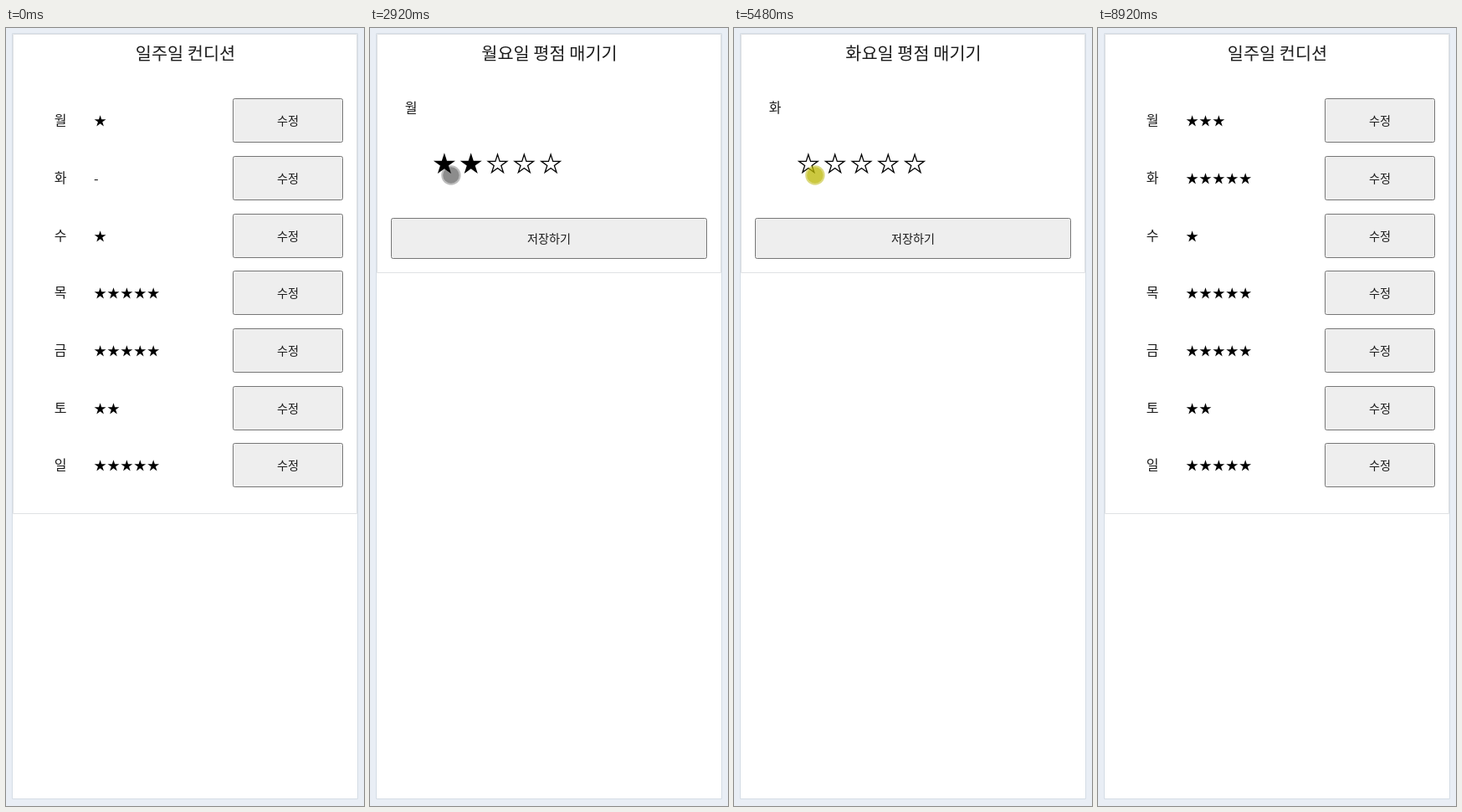
An HTML page with a canvas that plays this animation: 428 px wide and 930 px high, repeating every 9.08 s.

```html
<!DOCTYPE html>
<html lang="ko">
<head>
<meta charset="utf-8">
<style>
  html, body { margin: 0; width: 100%; height: 100%; overflow: hidden; background: #e9eef5; }
  canvas { display: block; }
</style>
</head>
<body>
<canvas id="stage" width="428" height="930"></canvas>
<script>
const g = document.getElementById('stage').getContext('2d');
const LOOP = 9080, STEP = 40;
const DAYS = '월화수목금토일';
const LIST = -1;
const START = [1, 0, 1, 5, 5, 2, 5];

const rowY = day => Math.round(110.2 + 68.7 * day);
const starX = n => 57.1 + 31.8 * n;

// Pointer targets; tapping one opens a page or sets the stars.
const at = (x, y) => ({ x, y });
const edit = day => ({ x: 348, y: rowY(day) - 5, page: day });
const rate = n => ({ x: starX(n) + 8, y: 176, stars: n });
const save = x => ({ x, y: 255, page: LIST });

// The pointer arrives, rests, taps shortly before it leaves.
const stops = [
  [1240, 1240, at(405, 357)],
  [1440, 1840, edit(0)],
  [2420, 2720, rate(2)],
  [2840, 3120, rate(1)],
  [3280, 3560, rate(3)],
  [3720, 4000, save(224)],
  [4620, 5000, edit(1)],
  [5400, 5640, rate(1)],
  [5720, 5880, save(110)],
  [5920, 6160, at(123, 190)],
  [6880, 7080, at(323.5, 545)],
  [7340, 7520, edit(1)],
  [7660, 7840, rate(5)],
  [8000, 8200, save(222)],
  [8900, 8900, at(315, 950)]
].map(([arrive, leave, to]) => ({ arrive, leave, to, press: leave - 160, release: leave - 80 }));

const isTap = s => 'page' in s.to || 'stars' in s.to;

function text(str, x, y, size, align = 'center') {
  g.font = `300 ${size}px "Noto Sans CJK KR Light", "Noto Sans CJK KR", sans-serif`;
  g.textAlign = align;
  g.fillStyle = '#1c1c1c';
  g.fillText(str, x, y + size * 0.38);
}

function star(x, y, r, full) {
  if (!full) r *= 0.86;
  g.beginPath();
  for (let i = 0; i < 10; i++) {
    const a = i * Math.PI / 5, d = i % 2 ? r * 0.382 : r;
    g.lineTo(x + d * Math.sin(a), y - d * Math.cos(a));
  }
  g.closePath();
  g.fillStyle = g.strokeStyle = '#000';
  g.lineWidth = 1.3;
  if (full) g.fill(); else g.stroke();
}

function box(x, y, w, h, r, fill, line) {
  g.beginPath();
  g.roundRect(x, y, w, h, r);
  g.fillStyle = fill;
  g.fill();
  if (!line) return;
  g.lineWidth = 1;
  g.strokeStyle = line;
  g.stroke();
}

function button(label, x, y, w, h) {
  box(x, y, w, h, 2, '#eee', '#767676');
  text(label, x + w / 2, y + h / 2 + 0.5, 14.2);
}

function card(title, bottom) {
  box(8.5, 7.5, 411, bottom - 7, 0, '#fff', '#dfe1e4');
  text(title, 214.5, 30, 20.8);
}

function drawList(scores) {
  card('일주일 컨디션', 580);
  scores.forEach((n, day) => {
    const y = rowY(day);
    text(DAYS[day], 65, y, 16);
    for (let k = 0; k < n; k++) star(112.6 + 15.9 * k, y + 1.5, 7.3, true);
    if (!n) text('-', 105, y + 1, 16, 'left');
    button('수정', 271.5, y - 25.5, 131, 52);
  });
}

function drawRating(day, score) {
  card(DAYS[day] + '요일 평점 매기기', 292);
  text(DAYS[day], 49, 95, 16);
  for (let n = 1; n <= 5; n++) star(starX(n), 163, 13.7, n <= score);
  button('저장하기', 25.5, 227.5, 377, 48);
}

// Tap highlight that holds briefly, then fades.
function drawFlash(n, age) {
  const alpha = 0.4 * Math.max(0, Math.min(1, (90 - age) / 50));
  box(8 + 32 * n, 136.5, 32, 43, 3, `rgba(51,181,229,${alpha})`);
}

function drawPointer(t) {
  const i = stops.findIndex(s => t < s.leave);
  if (i < 1) return;
  const a = stops[i - 1], b = stops[i];
  const u = Math.min(1, (t - a.leave) / (b.arrive - a.leave));
  const x = a.to.x + (b.to.x - a.to.x) * u * u * (3 - 2 * u);
  const y = a.to.y + (b.to.y - a.to.y) * Math.sin(u * Math.PI / 2);
  const down = isTap(b) && t >= b.press && t < b.release;
  g.fillStyle = down ? 'rgba(185,182,0,.5)' : 'rgba(0,0,0,.26)';
  for (const r of [11.7, 9.7]) {
    g.beginPath();
    g.arc(x, y, r, 0, 7);
    g.fill();
  }
}

function draw(now) {
  const t = Math.floor(now % LOOP / STEP) * STEP;
  const scores = [...START];
  let page = LIST, last;
  for (const s of stops.filter(s => isTap(s) && t >= s.release)) {
    if ('page' in s.to) page = s.to.page;
    else scores[page] = s.to.stars;
    last = s;
  }

  g.fillStyle = '#e9eef5';
  g.fillRect(0, 0, 428, 930);
  box(7.5, 6.5, 413, 915, 0, '#fff', '#d5dde5');
  if (page === LIST) drawList(scores);
  else drawRating(page, scores[page]);
  if (last && last.to.stars) drawFlash(last.to.stars, t - last.release);
  drawPointer(t);
}

const begin = performance.now();
function tick() {
  draw(performance.now() - begin);
  requestAnimationFrame(tick);
}
tick();
</script>
</body>
</html>
```
